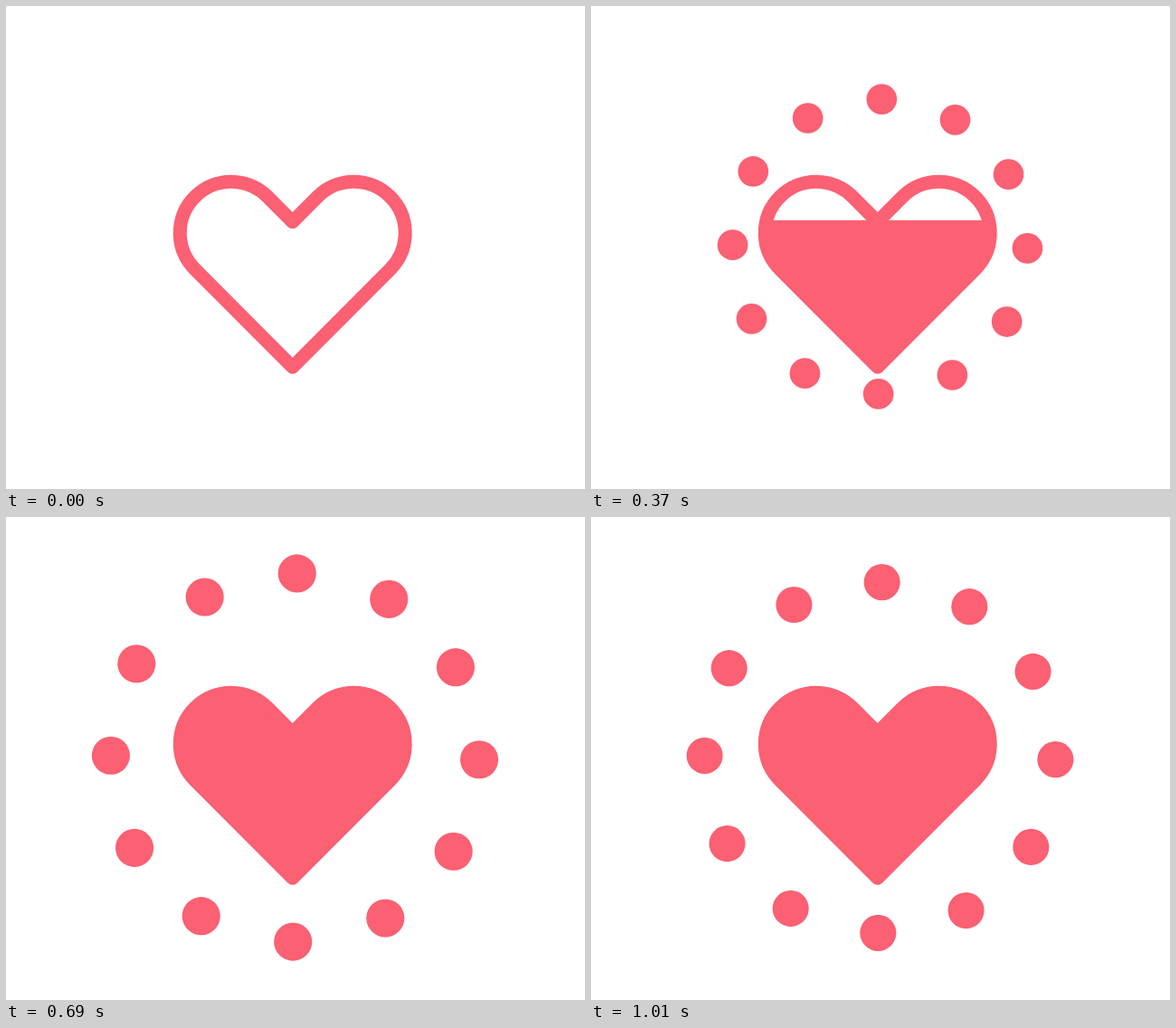
Write an HTML page that moves like this. It is 640x534 px and loops after 1040 ms.

```html
<!DOCTYPE html>
<html lang="en">
<head>
<meta charset="utf-8">
<title>Filling heart</title>
<style>
  html, body { margin: 0; width: 100%; height: 100%; overflow: hidden; background: #fff; }
  svg { display: block; width: 100%; height: 100%; }
</style>
</head>
<body>
<svg viewBox="0 0 640 534" fill="#fb6073">
  <defs>
    <!-- The lobes are exact half circles: the radius grows to fit the chord -->
    <path id="heart" d="M316.75 238.6 L289.1 210.9 A56 56 0 0 0 208.9 291.1
      L316.75 399.2 L424.6 291.1 A56 56 0 0 0 344.4 210.9 Z"/>
    <clipPath id="inside"><use href="#heart"/></clipPath>
  </defs>
  <g clip-path="url(#inside)"><rect id="level" x="180" width="280" height="240"/></g>
  <use href="#heart" fill="none" stroke="#fb6073" stroke-width="15" stroke-linejoin="round"/>
  <g id="dots"></g>
</svg>
<script>
const LOOP = 1040;
const REST_RADIUS = 193.9, PULSE = 10;
const level = document.getElementById('level');
const dots = document.getElementById('dots');

// Unit ring of twelve dots, scaled as a whole
for (let i = 0; i < 12; i++) {
  const angle = (i * 30 + 0.64) * Math.PI / 180;
  const dot = document.createElementNS('http://www.w3.org/2000/svg', 'circle');
  dot.setAttribute('cx', Math.sin(angle));
  dot.setAttribute('cy', -Math.cos(angle));
  dot.setAttribute('r', 0.1035);
  dots.append(dot);
}

// Steps last 30 ms, except these, which last 40 ms
const longSteps = new Set([0, 1, 2, 4, 12, 13, 27, 30]);
const stepStarts = [];
for (let i = 0, t = 0; i < 32; i++) {
  stepStarts.push(t);
  t += longSteps.has(i) ? 40 : 30;
}

const ease = (t, from, to) => {
  const x = Math.min(1, Math.max(0, (t - from) / (to - from)));
  return (1 - Math.cos(Math.PI * x)) / 2;
};

function draw(time) {
  const t = stepStarts.findLast(start => start <= time);
  level.setAttribute('y', 390 - 203 * ease(t, 27, 539));
  const radius = REST_RADIUS * ease(t, 181, 437)
    + PULSE * (ease(t, 449, 720) - ease(t, 720, 991));
  dots.setAttribute('transform', `translate(319.5 266) scale(${radius})`);
  dots.setAttribute('visibility', radius > 0 ? 'visible' : 'hidden');
}

function tick() {
  draw(performance.now() % LOOP);
  requestAnimationFrame(tick);
}
tick();
</script>
</body>
</html>
```
